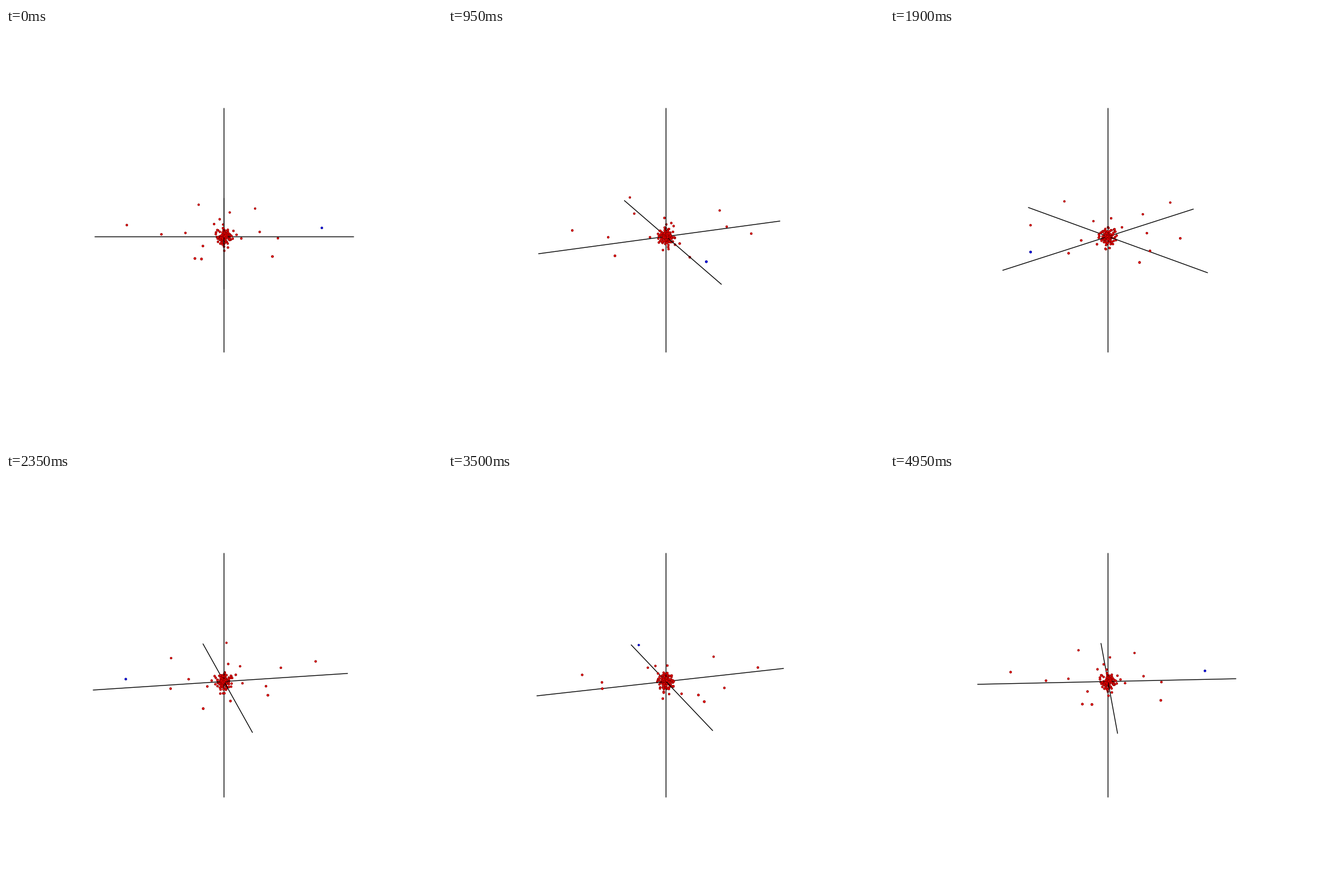
Write a matplotlib script that moves like this. It is 765 px wide and 732 px high and loops after 5 s.

```python
import numpy as np
import matplotlib.pyplot as plt
from matplotlib.animation import FuncAnimation

W, H, DPI = 765, 732, 64
FRAMES, INTERVAL = 100, 50
PT = 72 / DPI                      # points per pixel
AXIS = 227.5                       # half length of each axis
TILT = np.radians(20)
DIST = 6.18 * AXIS                 # camera distance

RED, RED_RIM = (0.93, 0, 0), (0.55, 0, 0)
BLUE, BLUE_RIM = (0, 0, 0.93), (0, 0, 0.55)

# x right, y towards the viewer, z up; the first one is blue
OUTER = np.array([
    (171, 0, 16), (-168.6, 8, 24), (-108, 20.7, 11.5), (-69, -28, -3.4),
    (-48, -126, 18.2), (10.8, -112.5, 7.3), (59.5, -136.5, 7.2),
    (62.5, 0, 8.5), (95, -4.7, -5), (78, 119.5, 9.2), (-48, 91, -5.5),
    (-35.1, 159, 20.5), (-36.7, 16.3, -11.7), (-7.5, 0, 32),
    (-17.5, -17, 17.2), (-1.5, -15, 17), (16.5, 1, 10.8), (22, 0, 3.2),
    (30.5, -4.7, -5.4), (7, -2, -21.5), (0.5, 6, -24.5), (0, -4.2, -20.5),
])


def cluster(count, radius):
    rng = np.random.default_rng(4)
    v = rng.normal(size=(count, 3))
    v /= np.linalg.norm(v, axis=1, keepdims=True)
    return v * radius * rng.uniform(0.1, 1, (count, 1))


POINTS = np.vstack([OUTER, cluster(125, 17)])
FACE = np.array([BLUE] + [RED] * (len(POINTS) - 1))
RIM = np.array([BLUE_RIM] + [RED_RIM] * (len(POINTS) - 1))


def turn(p, angle):
    c, s = np.cos(angle), np.sin(angle)
    x, y, z = p.T
    return np.column_stack([c * x - s * y, s * x + c * y, z])


def project(p):
    """Screen positions, perspective scale."""
    x, y, z = p.T
    depth = y * np.cos(TILT) + z * np.sin(TILT)
    scale = 1 / (1 - depth / DIST)
    up = (z * np.cos(TILT) - y * np.sin(TILT)) * scale
    return np.column_stack([W / 2 + x * scale, H / 2 - up]), scale


fig = plt.figure(figsize=(W / DPI, H / DPI), dpi=DPI, facecolor="white")
ax = fig.add_axes([0, 0, 1, 1])
ax.set_xlim(0, W)
ax.set_ylim(H, 0)
ax.axis("off")


def add_line(order):
    return ax.plot([], [], color="black", lw=1.4 * PT, zorder=order,
                   solid_capstyle="butt")[0]


# Painter's order: below the ground plane, ground axes, above the plane
lower, upper = add_line(2), add_line(6)
ground = [add_line(4), add_line(4)]
layers = [ax.scatter([], [], lw=0.8 * PT, zorder=z) for z in (1, 3, 5, 7)]

ENDS = AXIS * np.array([(-1, 0, 0), (1, 0, 0), (0, -1, 0), (0, 1, 0)])
(bottom, middle, top), _ = project(AXIS * np.array([(0, 0, -1), (0, 0, 0), (0, 0, 1)]))
lower.set_data(*zip(bottom, middle))
upper.set_data(*zip(middle, top))


def draw(i):
    angle = 2 * np.pi * i / FRAMES
    ends, _ = project(turn(ENDS, angle))
    for line, pair in zip(ground, (ends[:2], ends[2:])):
        line.set_data(pair[:, 0], pair[:, 1])

    p = turn(POINTS, angle)
    xy, scale = project(p)
    by_depth = np.argsort(scale)
    group = 2 * (p[:, 2] > 0) + (p[:, 1] > 0)
    for g, dots in enumerate(layers):
        idx = by_depth[group[by_depth] == g]
        dots.set_offsets(xy[idx])
        dots.set_sizes((3.6 * scale[idx] * PT) ** 2)
        dots.set_facecolor(FACE[idx])
        dots.set_edgecolor(RIM[idx])
    return [lower, upper, *ground, *layers]


anim = FuncAnimation(fig, draw, frames=FRAMES, interval=INTERVAL,
                     repeat=True, repeat_delay=0)
plt.show()
```
